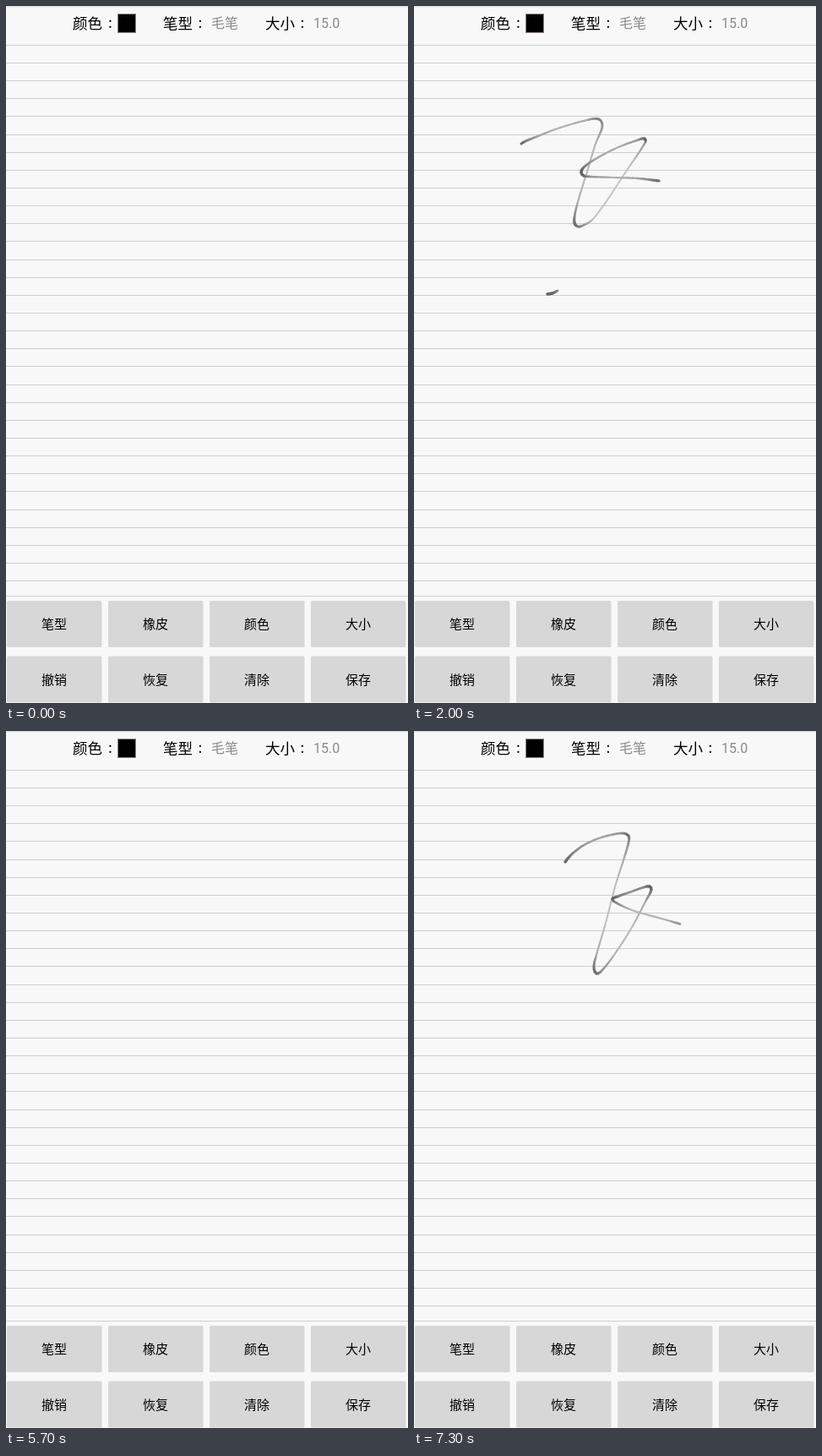
These frames come from a looping animation (476x825 px, 8000 ms). An HTML page with a canvas:

```html
<!DOCTYPE html>
<html lang="zh-CN">
<head>
<meta charset="utf-8">
<style>
  html, body { margin: 0; width: 100%; height: 100%; overflow: hidden; background: #f8f8f8; }
  svg, canvas { position: absolute; left: 0; top: 0; width: 476px; height: 825px; }
  canvas { mix-blend-mode: darken; }
  text { font-family: "Noto Sans CJK SC", "Noto Sans CJK", sans-serif; }
  .label { font-size: 17.5px; font-weight: 500; }
  .value { font-size: 16px; fill: #8a8a8a; }
  .number { font-family: Roboto, sans-serif; }
  .button { font-size: 15px; text-anchor: middle; }
</style>
</head>
<body>
<svg viewBox="0 0 476 825">
  <rect width="476" height="825" fill="#f8f8f8"/>
  <rect width="476" height="1" fill="#dedede"/>
  <rect y="1" width="476" height="1" fill="#eee"/>
  <g id="rules" fill="#cecece"></g>
  <g class="label">
    <text x="79" y="26.5">颜色</text><text x="121" y="26">:</text>
    <text x="186" y="26.5">笔型</text><text x="227.5" y="26">:</text>
    <text x="307" y="26.5">大小</text><text x="348.5" y="26">:</text>
  </g>
  <rect x="132.5" y="9.5" width="21" height="22" stroke="#8c8088"/>
  <text class="value" x="243" y="26">毛笔</text>
  <text class="value number" x="364" y="26">15.0</text>
  <g id="buttons"></g>
</svg>
<canvas id="ink" width="476" height="825"></canvas>
<script>
const LOOP = 8000, TICK = 100, CLEAR = 5700;

const rule = y => `<rect y="${y}" width="476" height="1"/>`;
let rules = rule(698);
for (let i = 0; i < 31; i++) rules += rule(Math.floor(46.42 + i * 21.14));
document.getElementById('rules').innerHTML = rules;

document.getElementById('buttons').innerHTML =
  ['笔型', '橡皮', '颜色', '大小', '撤销', '恢复', '清除', '保存'].map((name, i) => {
    const x = 1 + (i % 4) * 120, y = i < 4 ? 704 : 769.5;
    return `<rect x="${x}" y="${y}" width="112.5" height="55" rx="1.5" fill="#d7d7d7"/>` +
      `<text class="button" x="${x + 56}" y="${y + 33}">${name}</text>`;
  }).join('');

const distance = (a, b) => Math.hypot(b.x - a.x, b.y - a.y);
const mix = (a, b, u) => a + (b - a) * u;

// Key points are evenly spaced in time, so wide gaps mean a fast, thin, pale brush.
function stroke(start, steps, end, path) {
  const points = path.split(' ').map(pair => {
    const [x, y] = pair.split(',').map(Number);
    return { x, y };
  });
  points.forEach((p, i) => {
    const before = points[i - 1] || p, after = points[i + 1] || p;
    const gaps = before === p || after === p ? 1 : 2;
    const gap = (distance(before, p) + distance(p, after)) / gaps;
    const span = distance(before, after);
    p.speed = 1 - Math.exp(-gap / 15);
    p.dx = (after.x - before.x) / span;
    p.dy = (after.y - before.y) / span;
  });
  return { start, steps, end, points };
}

const strokes = [
  stroke(500, 9, CLEAR,
    '127,163 132,160 147,154 170,145 205,135 219,134 223,142 215,163 205,196 194,232 ' +
    '190,250 191,259 197,261 213,251 255,190 274,161 273,157 264,159 240,168 215,181 ' +
    '201,191 198,197 201,201 210,202 236,203 265,204 282,206 290,207'),
  stroke(2000, 3, CLEAR,
    '158,341 164,340 170,337 187,328 218,315 274,299 280,300'),
  stroke(2400, 4, CLEAR,
    '209,254 212,262 219,290 227,340 234,380 236,398 237,406'),
  stroke(2800, 2, CLEAR,
    '210,311 204,320 191,346 190,360'),
  stroke(6400, 9, LOOP,
    '179,155 182,151 190,143 203,134 222,126 246,121 254,124 254,132 248,153 239,181 ' +
    '227,227 216,265 213,279 216,287 222,284 237,265 257,234 274,202 281,188 279,184 ' +
    '272,185 255,191 241,196 235,199 239,203 258,212 300,224 315,228.5')
];

const ctx = document.getElementById('ink').getContext('2d');
ctx.lineCap = 'round';
ctx.globalCompositeOperation = 'darken';

function hermite(a, b, da, db, u) {
  const v = 1 - u;
  return v * v * (1 + 2 * u) * a + u * v * v * da + u * u * (3 - 2 * u) * b - u * u * v * db;
}

function drawSegment(a, b) {
  const length = distance(a, b), cuts = Math.ceil(length / 3);
  let x = a.x, y = a.y;
  for (let n = 1; n <= cuts; n++) {
    const u = n / cuts, speed = mix(a.speed, b.speed, u);
    const grey = Math.round(mix(50, 200, speed));
    ctx.strokeStyle = `rgb(${grey},${grey},${grey})`;
    ctx.lineWidth = mix(4.2, 1.8, speed);
    ctx.beginPath();
    ctx.moveTo(x, y);
    x = hermite(a.x, b.x, a.dx * length, b.dx * length, u);
    y = hermite(a.y, b.y, a.dy * length, b.dy * length, u);
    ctx.lineTo(x, y);
    ctx.stroke();
  }
}

function drawStroke({ start, steps, end, points }, t) {
  if (t < start || t >= end) return;
  const done = Math.min(Math.floor((t - start) / TICK) + 1, steps) / steps;
  const count = Math.round((points.length - 1) * done);
  for (let i = 0; i < count; i++) drawSegment(points[i], points[i + 1]);
}

const begin = performance.now();
function frame() {
  const t = (performance.now() - begin) % LOOP;
  ctx.clearRect(0, 0, 476, 825);
  strokes.forEach(s => drawStroke(s, t));
  requestAnimationFrame(frame);
}
frame();
</script>
</body>
</html>
```
